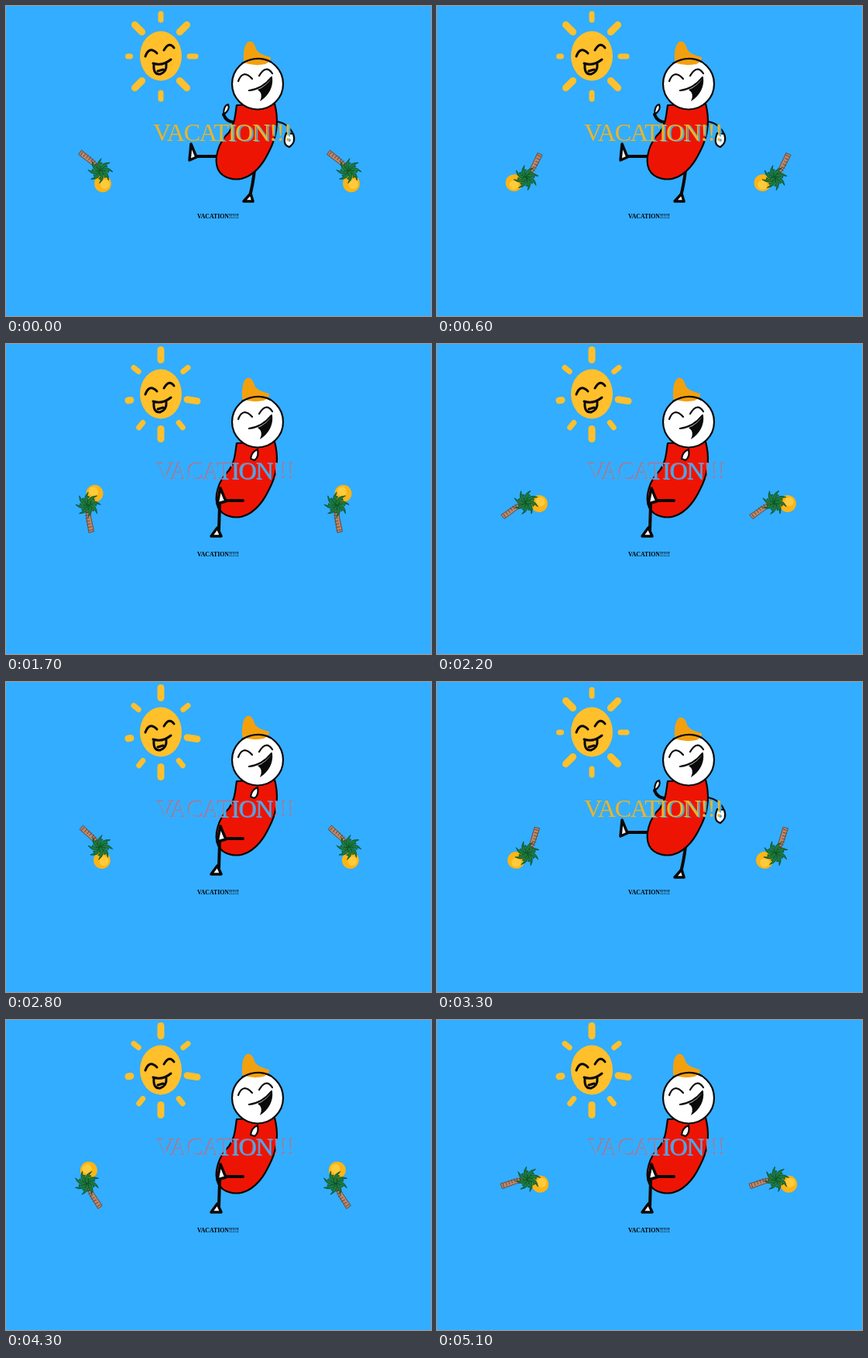
An HTML page for the animation above (5200 ms loop, 549 by 400 pixels).

```html
<!DOCTYPE html>
<html lang="en">
<head>
<meta charset="utf-8">
<title>Vacation</title>
<style>
  html, body { margin: 0; width: 100%; height: 100%; overflow: hidden; background: #33adff; }
  svg { display: block; width: 549px; height: 400px; }
  text { font-family: "Liberation Serif", "Times New Roman", serif; }
  .big { font-size: 32px; letter-spacing: -1.2px; }
  .ink { fill: none; stroke: #0a0808; stroke-width: 2.2; stroke-linecap: round; stroke-linejoin: round; }
  .face { stroke-width: 3; }
  .limb { stroke-width: 4; }
  .foot { fill: #fff; stroke-width: 3.5; }
  .hand { fill: #fff; }
  .rays { stroke: #ffc02c; stroke-linecap: round; }
</style>
</head>
<body>
<svg viewBox="0 0 549 400">
  <defs>
    <g id="palm">
      <circle cx="-3" cy="-20" r="11" fill="#fdb515"/>
      <circle cx="-5" cy="-22" r="6" fill="#ffcb3d"/>
      <path d="M-11 -4Q-7 14 1 31L7 28Q-1 12 -7 -5Z" fill="#b98a6c" stroke="#5d3a2c" stroke-width=".8"/>
      <g id="rings" stroke="#74493a"></g>
      <g id="fronds" fill="#1c7a38" stroke="#0b4722" stroke-width=".7"></g>
    </g>
  </defs>

  <rect width="549" height="400" fill="#33adff"/>

  <g id="raysA" class="rays"></g>
  <g id="raysB" class="rays"></g>
  <ellipse cx="200" cy="64.5" rx="27" ry="32" fill="#ffc02c"/>
  <path class="ink face" d="M180 65Q185 51 195 61M204 57Q211 45 217 54M190 74Q202 78 213 69M191 75Q190 89 199 88Q208 85 207 75M196 84L203 82"/>

  <g id="limbsA" class="ink">
    <path class="limb" d="M298 150Q285 151 281 140M272 194L243 194M321 212Q319 230 315 245"/>
    <path d="M350 149Q366 152 371 166"/>
    <path class="hand" d="M281 140Q281 128 287 127Q290 134 281 140ZM362 164L371 165Q375 176 366 182Q356 179 362 164Z"/>
    <path class="foot" d="M237 199L239 178L246 195ZM307 252L316 242L319 252Z"/>
  </g>

  <path class="ink" style="fill:#ee1404" d="M298 128C296 140 296 152 288 163C274 176 268 198 274 211C280 223 298 227 312 220C329 211 337 194 343 181C351 163 352 145 347 126Z"/>
  <circle class="ink" style="fill:#fff" cx="325" cy="100.5" r="33"/>
  <path id="hair" fill="#f3a00f" d="M307 70Q306 51 313 46Q320 44 323 55Q325 62 342 66Q343 71 335 75Q320 78 307 73Z"/>
  <path class="ink" d="M305 74Q324 63 342 72M300 97Q306 81 318 94M327 90Q336 75 344 87M314 109Q331 107 343 92"/>
  <path d="M325 108Q336 104 344 92Q346 111 328 123Q333 113 325 108Z" fill="#0a0808"/>

  <g id="limbsB" class="ink">
    <path class="limb" d="M306 202L280 202M276 207L275 240"/>
    <path class="hand" d="M316 148Q317 139 325 136Q327 146 321 150Z"/>
    <path class="foot" d="M273 206L277 186L284 203ZM265 248L273 237L278 248Z"/>
  </g>

  <g id="wordA" class="big">
    <text x="192" y="175" fill="#43aede">VACATION!!!</text>
    <text x="190" y="174" fill="#edb42a">VACATION!!!</text>
  </g>
  <g id="wordB" class="big">
    <text x="194" y="174" fill="#d8606f">VACATION!!!</text>
    <text x="195" y="174.5" fill="#3aaef5">VACATION!!!</text>
  </g>

  <use id="left" href="#palm"/>
  <use id="right" href="#palm"/>

  <text x="274" y="274" text-anchor="middle" font-size="7.8" font-weight="bold">VACATION!!!!!</text>
</svg>
<script>
const $ = id => document.getElementById(id);
const LOOP = 5200, STEP = 100, BEAT = 2.9;
const START = 152, SPIN = 13; // palm angle and degrees per step

const repeat = (count, make) => Array.from({ length: count }, (_, i) => make(i)).join("");

// Eight rays on an oval: every other one is long, the left one is a stub.
function rays(longOdd, tilt) {
  return repeat(8, i => {
    const a = i * Math.PI / 4 + tilt * Math.cos(i * Math.PI / 4);
    const long = i % 2 === longOdd, left = i === 4;
    const x = 200 + 41 * Math.cos(a), y = 65 + 51 * Math.sin(a);
    const half = left ? 1.5 : long ? 6.5 : 4;
    const dx = half * Math.cos(a), dy = half * Math.sin(a);
    return `<path d="M${x - dx} ${y - dy}L${x + dx} ${y + dy}" stroke-width="${long ? 9 : 7}"/>`;
  });
}
$("raysA").innerHTML = rays(1, 0);
$("raysB").innerHTML = rays(0, .15);

$("fronds").innerHTML = repeat(8, i =>
  `<path transform="translate(-8 -4) rotate(${i * 45 - 20})" d="M0 -2Q9 -7 16 2L11 0L10 3L7 0L0 2Z"/>`);

$("rings").innerHTML = repeat(8, i => {
  const u = i / 7, x = -8 + 4 * u + 7 * u * u, y = 3 + 24 * u;
  return `<path d="M${x - 2.3} ${y + 1}L${x + 2.3} ${y - 1}"/>`;
});

const show = (id, on) => $(id).setAttribute("visibility", on ? "visible" : "hidden");

function draw(ms) {
  const n = Math.floor(ms % LOOP / STEP);
  const kick = n % BEAT < BEAT / 2;
  for (const part of ["rays", "limbs", "word"]) {
    show(part + "A", kick);
    show(part + "B", !kick);
  }
  $("hair").setAttribute("transform", kick ? "" : "translate(-2 -2)");
  const angle = START + SPIN * n;
  $("left").setAttribute("transform", `translate(113 213) rotate(${angle})`);
  $("right").setAttribute("transform", `translate(434 213) rotate(${angle})`);
}

let start;
function tick(now) {
  start ??= now;
  draw(now - start);
  requestAnimationFrame(tick);
}
draw(0);
requestAnimationFrame(tick);
</script>
</body>
</html>
```
